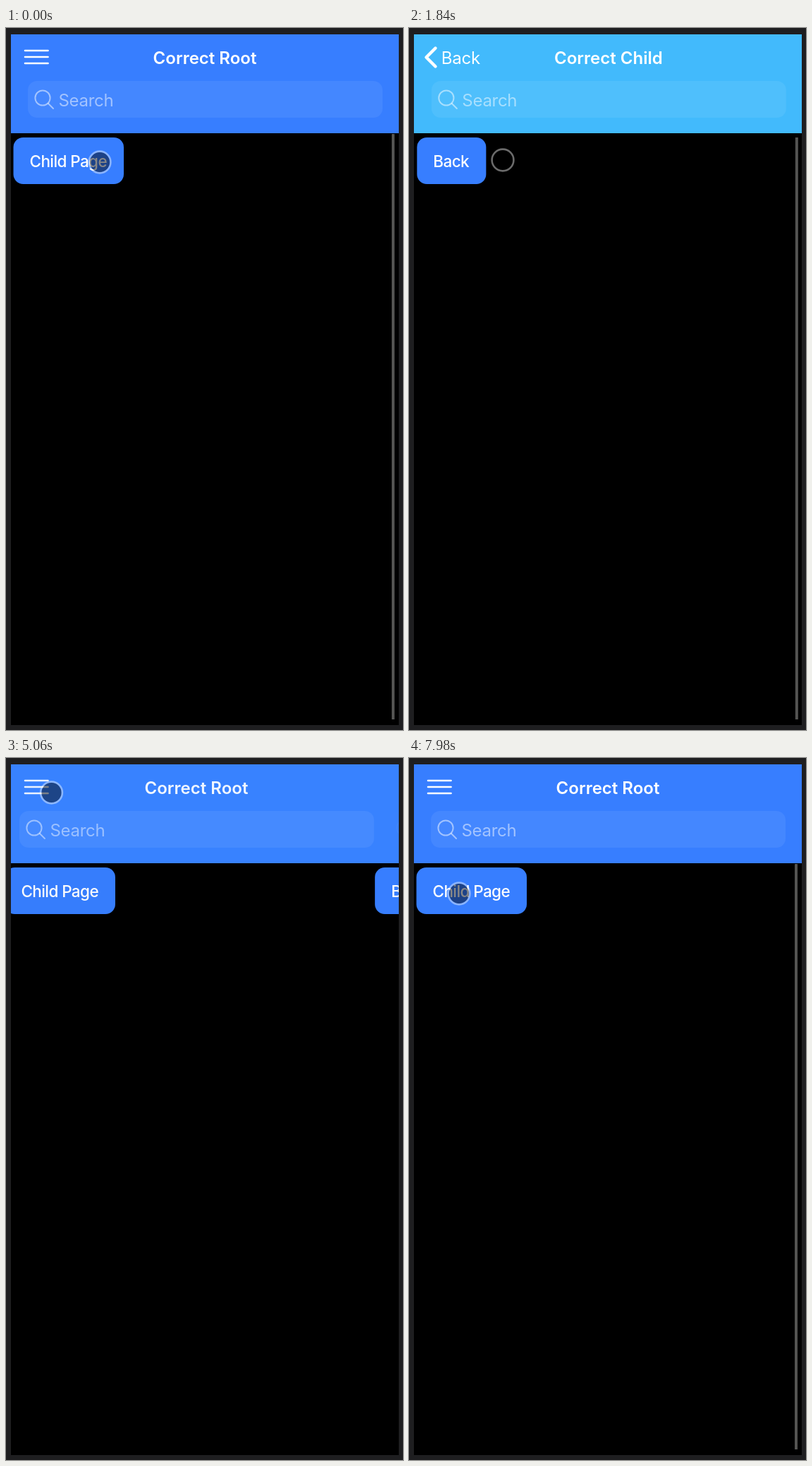
Write an HTML page with a canvas that moves like this. It is 563 px wide and 994 px high and loops after 8 s.

```html
<!DOCTYPE html>
<html lang="en">
<head>
<meta charset="utf-8">
<title>Page navigation</title>
<style>
html, body { margin: 0; width: 100%; height: 100%; overflow: hidden; background: #1e1e20; }
canvas { display: block; width: 563px; height: 994px; }
</style>
</head>
<body>
<canvas id="stage" width="563" height="994"></canvas>
<script>
const ctx = document.getElementById('stage').getContext('2d');
const LOOP = 8000;
const PUSH = 416, POP = 4463;
const RATE = 4.54;
const BOX = { x: 7, y: 9, w: 550, h: 978 };
const HEADER_END = 149;
const SLIDE = 549, PARALLAX = 182;
const ROOT = [55, 126, 255], CHILD = [66, 186, 252];

const clamp = v => Math.min(1, Math.max(0, v));
const ramp = (t, from, to) => clamp((t - from) / (to - from));
const ease = k => k * k * (3 - 2 * k);
const settle = ms => Math.exp(-RATE * Math.max(0, ms) / 1000);

// 1 = root page fully shown, 0 = child page fully shown
const rootShare = t => t < POP ? settle(t - PUSH) : 1 - settle(t - POP);

// time, x, y of the pointer
const PATH = [
  [0, 133, 190], [400, 133, 187], [2000, 133, 187], [2750, 64, 47],
  [3400, 64, 47], [4100, 64.5, 49], [6500, 64.5, 49], [7400, 71, 192], [8000, 71, 192]
];

function pointerAt(t) {
  const i = PATH.findIndex(p => p[0] > t);
  const [t0, x0, y0] = PATH[i - 1], [t1, x1, y1] = PATH[i];
  const k = ease(ramp(t, t0, t1));
  return [x0 + (x1 - x0) * k, y0 + (y1 - y0) * k];
}

// Runs draw shifted by dx and with its own opacity.
function layer(dx, alpha, draw) {
  if (alpha < 0.004) return;
  ctx.save();
  ctx.translate(dx, 0);
  ctx.globalAlpha = alpha;
  draw();
  ctx.restore();
}

function clipped(x, y, w, h, draw) {
  ctx.save();
  ctx.beginPath();
  ctx.rect(x, y, w, h);
  ctx.clip();
  draw();
  ctx.restore();
}

function rounded(x, y, w, h, r, color) {
  ctx.fillStyle = color;
  ctx.beginPath();
  ctx.roundRect(x, y, w, h, r);
  ctx.fill();
}

function label(str, x, y, size, weight, spacing, color = '#fff', align = 'left') {
  ctx.font = `${weight} ${size}px Inter, "Open Sans", sans-serif`;
  ctx.letterSpacing = spacing + 'px';
  ctx.textAlign = align;
  ctx.fillStyle = color;
  ctx.fillText(str, x, y);
}

function stroke(points, width, color) {
  ctx.strokeStyle = color;
  ctx.lineWidth = width;
  ctx.lineCap = ctx.lineJoin = 'round';
  ctx.beginPath();
  points.forEach(([x, y]) => ctx.lineTo(x, y));
  ctx.stroke();
}

function circle(x, y, r) {
  ctx.beginPath();
  ctx.arc(x, y, r, 0, Math.PI * 2);
}

function searchField() {
  const tint = 'rgba(255,255,255,0.5)';
  rounded(31, 75, 503, 52, 13, 'rgba(255,255,255,0.065)');
  circle(52, 99, 10.6);
  ctx.strokeStyle = tint;
  ctx.lineWidth = 2;
  ctx.stroke();
  stroke([[60, 107], [67, 114]], 2, tint);
  label('Search', 74.5, 110.5, 24, 400, -0.3, tint);
}

function title(str) {
  label(str, 282, 50.5, 24, 600, 0, '#fff', 'center');
}

function menuIcon() {
  for (const y of [32, 41, 50]) stroke([[27, y], [59.5, y]], 2.6, '#fff');
}

function header(q, rootX, childX) {
  const mix = CHILD.map((c, i) => Math.round(c + (ROOT[i] - c) * q));
  ctx.fillStyle = `rgb(${mix})`;
  ctx.fillRect(BOX.x, BOX.y, BOX.w, HEADER_END - BOX.y);

  layer(rootX, q, () => { searchField(); title('Correct Root'); });
  layer(childX, 1 - q, () => { searchField(); title('Correct Child'); });

  layer(0, q ** 1.5, menuIcon);
  const backAlpha = (1 - q) ** 3;
  layer(0, backAlpha, () => stroke([[37.5, 28.5], [24.5, 41.5], [37.5, 54.5]], 4.4, '#fff'));
  layer(childX * 0.31, backAlpha, () => label('Back', 45.5, 50.5, 24, 400, -0.2));
}

function button(str, width) {
  rounded(10.5, 155, width, 66, 14, '#377eff');
  label(str, 33.5, 197, 22.5, 500, -0.6);
}

function scrollBar(top, alpha) {
  ctx.fillStyle = `rgba(84,84,82,${alpha})`;
  ctx.fillRect(547, top, 4, 979 - top);
}

function pages(t, q, rootX, childX) {
  const rootBar = t < POP ? 1 - ramp(t, PUSH, PUSH + 150) : ramp(t, 5480, 5720);
  const childBar = t < POP ? ramp(t, 1436, 1676) : 1 - ramp(t, POP, POP + 150);

  layer(rootX, 1, () => {
    button('Child Page', 156.5);
    scrollBar(150, rootBar);
  });
  ctx.fillStyle = `rgba(0,0,0,${0.2 * (1 - q)})`;
  ctx.fillRect(BOX.x, HEADER_END, BOX.w, BOX.h);

  layer(childX, 1, () => {
    ctx.fillStyle = '#000';
    ctx.fillRect(BOX.x, HEADER_END, BOX.w, BOX.h);
    if (q > 0.9999) return;
    button('Back', 98);
    scrollBar(155, childBar);
  });
}

function pointer(t) {
  const [x, y] = pointerAt(t);
  circle(x, y, 14.2);
  ctx.fillStyle = 'rgba(0,0,0,0.47)';
  ctx.fill();
  circle(x, y, 15.4);
  ctx.strokeStyle = 'rgba(255,255,255,0.42)';
  ctx.lineWidth = 2.6;
  ctx.stroke();
}

function render(t) {
  const q = rootShare(t);
  const rootX = -PARALLAX * (1 - q);
  const childX = SLIDE * q;

  ctx.fillStyle = '#1e1e20';
  ctx.fillRect(0, 0, 563, 994);
  ctx.fillStyle = '#000';
  ctx.fillRect(BOX.x, BOX.y, BOX.w, BOX.h);
  clipped(BOX.x, HEADER_END, BOX.w, BOX.y + BOX.h - HEADER_END, () => pages(t, q, rootX, childX));
  clipped(BOX.x, BOX.y, BOX.w, HEADER_END - BOX.y, () => header(q, rootX, childX));
  pointer(t);
}

const start = performance.now();
function tick() {
  render((performance.now() - start) % LOOP);
  requestAnimationFrame(tick);
}
tick();
</script>
</body>
</html>
```
